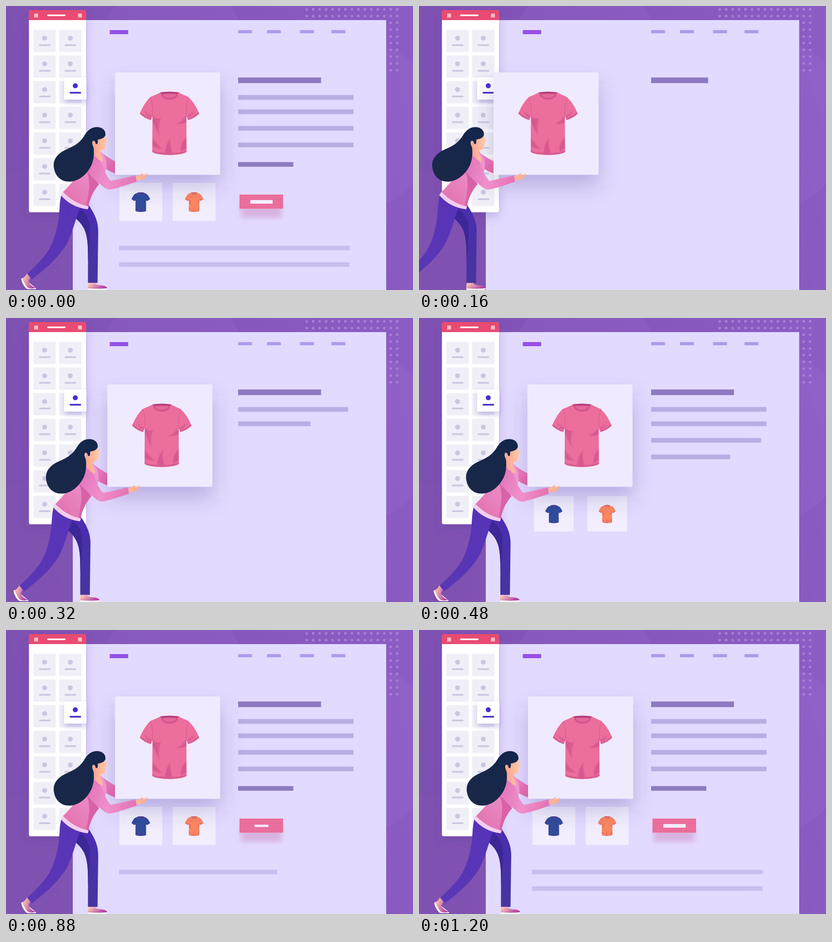
An HTML page that plays this animation: 896x625 px, repeating every 2.88 s.

```html
<!DOCTYPE html>
<html lang="en">
<head>
<meta charset="utf-8">
<title>Shop page builder</title>
<style>
  html, body { margin: 0; width: 100%; height: 100%; overflow: hidden; background: #8558bd; }
  svg { display: block; width: 896px; height: 625px; }
</style>
</head>
<body>
<svg viewBox="0 0 896 625">
  <defs>
    <linearGradient id="bg" x1="0" y1="0.5" x2="1" y2="0.3">
      <stop offset="0" stop-color="#7c50b1"/><stop offset="1" stop-color="#8b5cc3"/>
    </linearGradient>
    <linearGradient id="sleeve" gradientUnits="userSpaceOnUse" x1="190" y1="350" x2="287" y2="385">
      <stop offset="0" stop-color="#e47abd"/><stop offset=".45" stop-color="#f08fcd"/><stop offset="1" stop-color="#e472b2"/>
    </linearGradient>
    <linearGradient id="torso" x1="1" y1="0" x2=".2" y2="1">
      <stop offset="0" stop-color="#f19ad6"/><stop offset=".6" stop-color="#e984c0"/><stop offset="1" stop-color="#e272ae"/>
    </linearGradient>
    <linearGradient id="farSleeve" x1="0" y1="0" x2="1" y2=".6">
      <stop offset="0" stop-color="#ef8fcb"/><stop offset="1" stop-color="#d85fa6"/>
    </linearGradient>
    <linearGradient id="skin" x1="0" y1="0" x2="1" y2="0">
      <stop offset="0" stop-color="#fba48f"/><stop offset="1" stop-color="#fecdab"/>
    </linearGradient>
    <linearGradient id="backLeg" x1=".8" y1="0" x2=".2" y2="1">
      <stop offset="0" stop-color="#5733b8"/><stop offset="1" stop-color="#5a37b4"/>
    </linearGradient>
    <linearGradient id="frontLeg" x1="0" y1="0" x2="0" y2="1">
      <stop offset="0" stop-color="#4b2db0"/><stop offset="1" stop-color="#46359f"/>
    </linearGradient>
    <linearGradient id="shoe" x1="0" y1="0" x2="1" y2=".4">
      <stop offset=".1" stop-color="#fdc9b4"/><stop offset="1" stop-color="#b040a4"/>
    </linearGradient>
    <linearGradient id="hair" x1=".7" y1="0" x2=".3" y2="1">
      <stop offset="0" stop-color="#14264a"/><stop offset="1" stop-color="#1a2848"/>
    </linearGradient>
    <filter id="blurS" x="-50%" y="-50%" width="200%" height="200%"><feGaussianBlur stdDeviation="6"/></filter>
    <filter id="blurM" x="-50%" y="-20%" width="200%" height="140%"><feGaussianBlur stdDeviation="11"/></filter>
    <filter id="blurL" x="-40%" y="-40%" width="180%" height="180%"><feGaussianBlur stdDeviation="23"/></filter>
    <filter id="soft" x="-30%" y="-30%" width="160%" height="160%"><feGaussianBlur stdDeviation="1"/></filter>

    <!-- T-shirt centred on the origin, tinted through color -->
    <g id="shirt" transform="translate(-360 -258)">
      <path fill="currentColor" d="M340 190C332 195 324 197 317 201C306 212 299 226 294.5 237Q305 247 318.5 251Q321 246 322.5 242L322 321Q328 327 360 328Q392 327 397.5 321L397 242Q399 247 401 251Q415 247 425.5 237C420 224 413 211 402 201C396 197 388 195 380 190Q360 187 340 190Z"/>
      <g fill="#8a1a62" fill-opacity=".2">
        <path d="M294.5 237Q305 247 318.5 251L319.5 248Q307 243 296 234ZM425.5 237Q415 247 401 251L400 248Q413 243 424 234Z"/>
        <path d="M322 317Q330 323 360 324Q390 323 397.5 317V321Q392 327 360 328Q328 327 322 321Z"/>
        <g filter="url(#soft)">
          <path d="M323 241Q334 253 341 246Q334 262 337 285Q327 262 323 256ZM397 241Q387 256 375 258Q384 262 397 256Z"/>
          <path d="M323 290Q330 304 344 314Q331 314 323 308ZM350 324Q351 304 362 291Q360 309 366 324ZM386 321Q382 306 397 288V313Z"/>
          <path d="M304 229Q314 240 321 241L319 246Q309 240 304 229ZM416 229Q406 240 399 241L401 246Q411 240 416 229Z"/>
        </g>
      </g>
      <path fill="none" stroke="#8a1a62" stroke-opacity=".2" stroke-width="1.2" d="M318 201Q324 215 322.5 242M402 201Q396 215 397 242"/>
      <path fill="#8a1a62" fill-opacity=".28" d="M340 190Q360 187 380 190Q377 206 360 206Q343 206 340 190Z"/>
      <path fill="currentColor" fill-opacity=".75" d="M344 192Q360 195 376 192Q373 202 360 202Q347 202 344 192Z"/>
      <path fill="#8a1a62" fill-opacity=".38" d="M340 190Q360 187 380 190L376 194Q360 191 344 194Z"/>
    </g>
  </defs>

  <rect width="896" height="625" fill="url(#bg)"/>
  <g fill="#a878dd" fill-opacity=".12">
    <circle cx="367" cy="97" r="160"/>
    <circle cx="760" cy="260" r="190"/>
  </g>
  <circle cx="0" cy="591" r="230" fill="#9055a8" fill-opacity=".13"/>
  <g id="dots" fill="#a47dd4"></g>

  <rect x="147" y="31" width="690" height="594" fill="#e3daff"/>
  <rect x="228.5" y="53" width="40.5" height="9" fill="#9550e5"/>
  <path stroke="#af9ae9" stroke-width="7" d="M511 56.5h30.5M574.5 56.5h30.5M647.5 56.5h30.5M716.5 56.5h30.5"/>

  <rect x="52" y="24" width="123" height="438" fill="#503c96" fill-opacity=".28" filter="url(#blurM)"/>
  <rect x="50.5" y="12" width="125.5" height="442" rx="4" fill="#fff"/>
  <path fill="#e94b71" d="M50 31V13q0-4 4-4h118.500q4 0 4 4V31Z"/>
  <path stroke="#fff" stroke-width="1.8" d="M62 17.800h8.500M62 21h8.500M62 24.200h8.500M158.500 17.800h8.500M158.500 21h8.500M158.500 24.200h8.500"/>
  <rect x="90.500" y="18.700" width="40.500" height="3.500" rx="1.700" fill="#fff"/>
  <g id="cells"></g>
  <rect x="130" y="163" width="46" height="49" fill="#503cb4" fill-opacity=".32" filter="url(#blurS)"/>
  <g id="picked"></g>

  <g id="lines"></g>

  <g id="thumbs"></g>

  <g id="button">
    <rect x="517" y="431" width="90" height="35" fill="#c87bb8" fill-opacity=".42" filter="url(#blurS)"/>
    <rect x="514" y="415" width="96" height="31" fill="#ea6e9b"/>
  </g>
  <rect id="label" x="538" y="427" width="49" height="8" fill="#f3ecff"/>

  <g id="carrier">
    <rect x="240" y="171" width="232" height="225" fill="#46378c" fill-opacity=".27" filter="url(#blurL)"/>
    <path fill="url(#farSleeve)" d="M203 317Q222 333 246 345V370Q224 364 212 352Z"/>
    <rect x="240" y="146" width="231.500" height="225.500" rx="3" fill="#f0eafe"/>
    <use href="#shirt" x="360" y="258" color="#eb6e9c"/>

    <!-- legs and shoes -->
    <path fill="url(#frontLeg)" d="M150 440L182 438C197 460 203 476 203 496L201.500 609.500H180.500C180 570 182 535 178 510C175 492 168 480 156 468Z"/>
    <path fill="#3d2696" d="M157 443C172 450 184 466 185 488C186 520 180 550 180 580C181 550 181 525 178 510C175 492 168 480 152 466Z"/>
    <path fill="url(#backLeg)" d="M122 416C118 428 118 450 116 468C112 495 104 522 92 540C80 558 62 575 46 590L57 601.500C88 578 112 557 131 528C147 501 152 470 163 445Z"/>
    <path fill="#fff" d="M34 599Q33 604 38 613Q43 623 49 623H66V621L40 600Z"/>
    <path fill="url(#shoe)" d="M46 588.500L54 598Q48 605 51 610Q58 618 66 620.500Q55 623 48 620Q42 614 35.500 599Q41 598 46 588.500Z"/>
    <path fill="#fff" d="M180 621H223Q222 625 218 625H182Q180 625 180 621Z"/>
    <path fill="url(#shoe)" d="M181.500 609.500H195Q198 614 207 614.500Q221 615 223 621Q210 623 180 621.500Q180 614 181.500 609.500Z"/>

    <!-- sweater -->
    <path fill="#fdb99f" d="M192 300L208 312L214 342Q202 345 192 326Z"/>
    <path fill="url(#torso)" d="M192 320C197 332 206 342 214 342Q212 331 206 320C216 326 222 338 221 356C218 376 201 392 192 404C186 414 184 428 180 443C158 442 138 430 124 411C138 397 150 384 158 370Z"/>
    <path fill="#d962a6" d="M176 361C185 378 186 400 176 441L181 442C186 420 192 408 205 392Z"/>
    <path fill="#f3cdf0" d="M125.500 409Q150 435 182 441L180 447.500Q143 443 120.500 416Z"/>
    <path fill="url(#sleeve)" d="M192 330C206 336 211 346 216 360Q222 376 231 385L285 373L287.500 386.500Q250 400 229 404Q220 404 211 395C200 386 187 374 177 361Z"/>
    <path fill="#fdb497" d="M286 374.500Q294 372 299 368.500Q303 367 301 370L300 373Q306 372 310 369Q312.500 370 308 374.500Q309 378 305 380Q297 384 287.500 384Z"/>
    <path fill="none" stroke="#f49a86" stroke-width=".7" d="M299 377L309 374M298 380L306 378"/>

    <!-- head and hair -->
    <path fill="url(#skin)" d="M193 290L217 282Q221 288 221 292L223.500 299L220.500 301L221 306L219 308Q220 316 213 317Q207 317 203 315L213 338Q201 341 194 322Z"/>
    <path fill="url(#hair)" d="M219 284C220 272 210 266 199 266.500C187 267 179 274 172 286C160 305 145 310 130 317C112 326 104 338 105 353C107 374 121 387 140 386.500C163 386 182 366 189 348C194 336 194 322 193 311Q188 302 191 297Q196 295 197 303L201 304Q203 299 202 294C210 293 217 290 219 284Z"/>
    <path fill="#fca991" d="M191 297Q196 295 197.500 304Q198 313 196 318Q189 307 191 297Z"/>
  </g>
</svg>
<script>
const LOOP = 2880, STEP = 80, LAST = 1200, GROW = 250;
const SLIDE = [128, 76, 40.2, 17, 6, 1.4];
const $ = id => document.getElementById(id);

const easeOut = (t, start) => {
  const u = Math.min(1, Math.max(0, (t - start) / GROW));
  return 1 - (1 - u) ** 3;
};

const rect = (x, y, w, h, fill, rx = 0) =>
  `<rect x="${x}" y="${y}" width="${w}" height="${h}" rx="${rx}" fill="${fill}"/>`;

const tile = (x, y, back, ink) =>
  rect(x, y, 49, 49, back, 2) +
  `<circle cx="${x + 24.5}" cy="${y + 18.5}" r="5.5" fill="${ink}"/>` +
  rect(x + 12, y + 32, 25.5, 3.8, ink, 1.9);

const scaleAbout = (el, cx, cy, s) => {
  el.setAttribute('transform', `translate(${cx} ${cy}) scale(${s}) translate(${-cx} ${-cy})`);
  el.style.display = s > 0 ? '' : 'none';
};

// Static repeats
let dots = '';
for (let row = 0; row < 10; row++)
  for (let col = row < 2 ? 0 : 13; col < 15; col++)
    dots += `<circle cx="${662 + col * 14.22}" cy="${7.3 + row * 14.9}" r="3"/>`;
$('dots').innerHTML = dots;

let cells = '';
for (let row = 0; row < 7; row++)
  for (const x of [60.5, 117]) cells += tile(x, 52.2 + row * 56.5, '#f0eff8', '#cbc7df');
$('cells').innerHTML = cells;
$('picked').innerHTML = tile(128, 157, '#fff', '#4d2fcc');

// Text placeholders that grow from the left
const DARK = '#8c7bc1', MID = '#baade5', PALE = '#cabeee';
const lines = [
  [511, 157.3, 182.5, 12.4, DARK, 79.7],
  [511, 196, 254, 10.3, MID, 160],
  [511, 227.6, 254, 10.3, MID, 250],
  [511, 264, 254, 10.3, MID, 320],
  [511, 300.6, 254, 10.3, MID, 400],
  [511, 343.5, 121.5, 10.2, DARK, 480],
  [249, 527.5, 507.5, 10.2, PALE, 800],
  [249, 564, 507.5, 10.2, PALE, 972]
].map(([x, y, width, h, fill, start], i) => {
  $('lines').insertAdjacentHTML('beforeend', rect(x, y, width, h, fill));
  return { el: $('lines').children[i], width, start };
});

const thumbs = [[296.8, '#2f4c9c'], [414.2, '#fc8760']].map(([cx, color], i) => {
  $('thumbs').insertAdjacentHTML('beforeend', `<g>${rect(cx - 47.2, 389, 94.4, 84, '#f2eefe', 2)}
    <use href="#shirt" transform="translate(${cx} 431.5) scale(.31)" color="${color}"/></g>`);
  return { el: $('thumbs').children[i], cx };
});

function draw(t) {
  // The opening pose is the finished page
  const now = t < STEP ? LAST : Math.min(LAST, Math.floor(t / STEP) * STEP);
  const slide = SLIDE[now / STEP - 1] || 0;
  $('carrier').setAttribute('transform', `translate(${-slide} 0)`);
  for (const { el, width, start } of lines) el.setAttribute('width', width * easeOut(now, start));
  for (const { el, cx } of thumbs) scaleAbout(el, cx, 431, easeOut(now, 335));
  scaleAbout($('button'), 562, 430.5, easeOut(now, 560));
  scaleAbout($('label'), 562.3, 431, easeOut(now, 810));
}

function tick() {
  draw(performance.now() % LOOP);
  requestAnimationFrame(tick);
}
tick();
</script>
</body>
</html>
```
